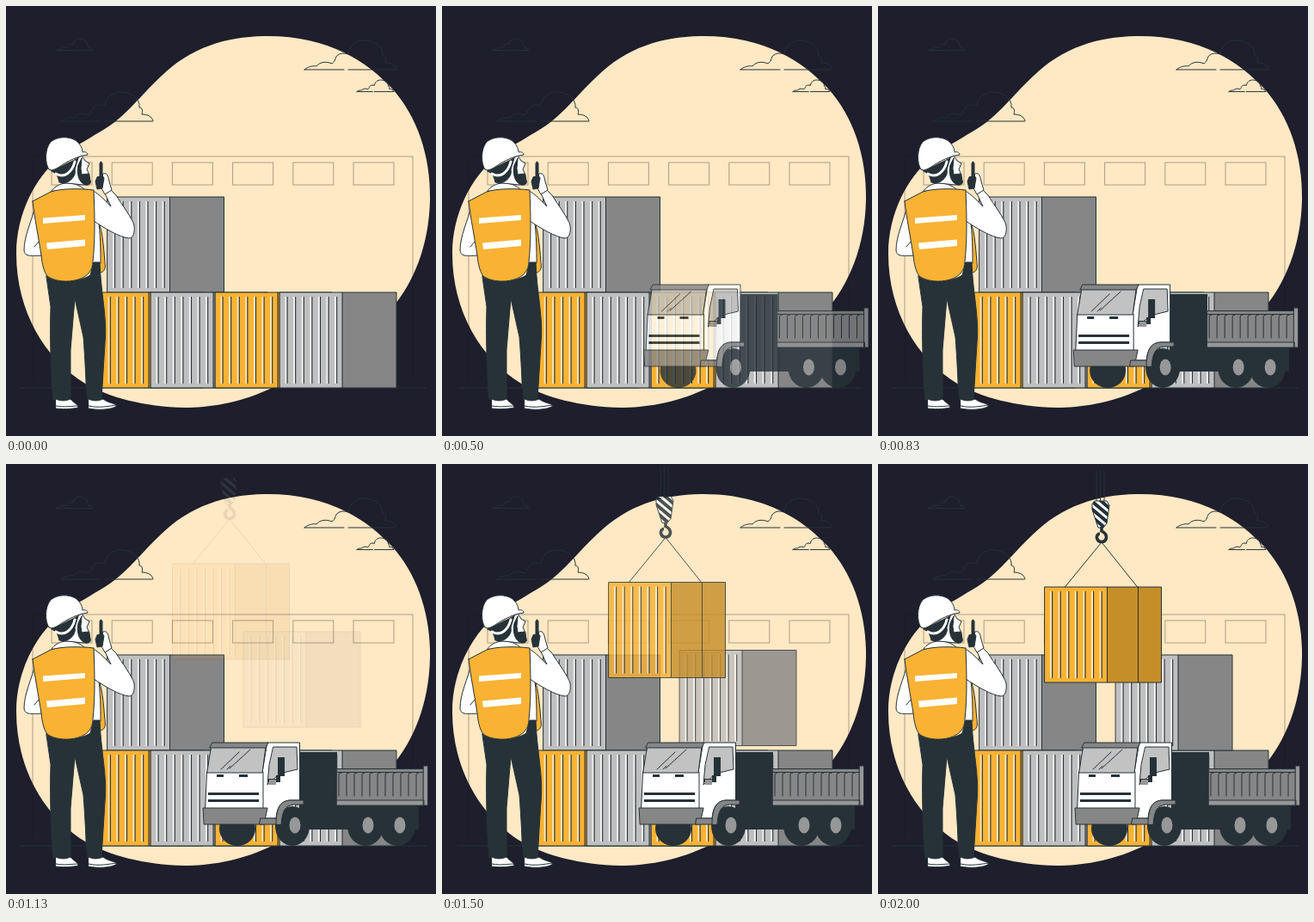
Animation of 500 by 500 pixels, one loop 2.04 s. Source, as an HTML page:

```html
<!DOCTYPE html>
<html lang="en">
<head>
<meta charset="utf-8">
<title>Loading yard</title>
<style>
html, body { margin: 0; width: 100%; height: 100%; overflow: hidden; background: #1e1e2c; }
svg { display: block; width: 100vw; height: 100vh; }
.ink { stroke: #263238; stroke-width: 1; stroke-linejoin: round; stroke-linecap: round; }
.dark { fill: #263238; }
.white { fill: #fff; }
.grey { fill: #868686; }
.pale { fill: #c2c2c2; }
.orange { fill: #f9b233; }
.line { fill: none; }
</style>
</head>
<body>
<svg viewBox="0 0 500 500">
  <defs>
    <g id="cloud" class="ink line">
      <path vector-effect="non-scaling-stroke" d="M0 34C3 31 10 29 14 30C18 25 25 24 32 27C37 24 35 19 39 17C43 14 47 15 51 16C52 6 60 0 69 0C82 0 92 8 91 18C95 18 95 23 94 26C100 26 106 28 107 34"/>
      <path vector-effect="non-scaling-stroke" d="M0 34H46M51 34H106"/>
    </g>
    <clipPath id="block"><path d="M252 43H266L269 48L266 69L262 74H256L249 53V47Z"/></clipPath>
  </defs>

  <path fill="#ffe8c4" d="M300 35C375 34 420 65 449 96C478 128 494 175 493 225C492 280 473 322 450 350C415 395 350 425 305 446C270 462 235 467 208 467C160 466 120 455 92 439C45 410 12 355 12 288C12 240 35 200 60 178C75 165 88 160 103 150C140 130 150 110 180 82C215 48 255 36 300 35Z"/>
  <g id="building" fill="none" stroke="#1c1a18" stroke-opacity=".36">
    <path d="M31 436V175H473V436"/>
  </g>
  <use href="#cloud" transform="translate(58 38) scale(.4)"/>
  <use href="#cloud" transform="translate(347 40)"/>
  <use href="#cloud" transform="translate(408 86) scale(.4)"/>
  <use href="#cloud" transform="translate(64 100)"/>
  <path class="ink" d="M18 444H489"/>

  <g id="stack"></g>
  <g id="load">
    <g id="greyLoad"></g>
    <g id="craneLoad">
      <path class="ink line" d="M254 8V44M258.500 8V44M263 8V44M217 143.500L260 91L302 143.500"/>
      <g clip-path="url(#block)">
        <rect class="white" x="246" y="40" width="26" height="36"/>
        <path stroke="#263238" stroke-width="4" d="M246 41L272 63M246 50L272 72M246 59L272 81M256 40L272 54"/>
      </g>
      <path class="ink line" d="M252 43H266L269 48L266 69L262 74H256L249 53V47Z"/>
      <path fill="none" stroke="#263238" stroke-width="3.600" d="M260 73V78C264 80 266 82 265.500 86C264 92 256 92 254.500 86C254 83 256 81 258 81"/>
    </g>
  </g>

  <g id="truck">
    <path class="dark" d="M341 335H385V397H480V425H341Z"/>
    <ellipse class="dark" cx="269" cy="424" rx="21" ry="20"/>
    <ellipse class="dark" cx="333" cy="421" rx="20" ry="23"/>
    <ellipse class="dark" cx="418" cy="421" rx="21" ry="23"/>
    <ellipse class="dark" cx="455" cy="421" rx="21" ry="23"/>
    <g fill="#979797">
      <ellipse cx="336" cy="420" rx="6.500" ry="9.500"/>
      <ellipse cx="421" cy="420" rx="6.500" ry="9.500"/>
      <ellipse cx="458" cy="420" rx="6.500" ry="9.500"/>
    </g>
    <g class="ink">
      <path class="white" d="M304 324H341.500V391H330C319 392 315 400 314 412H298V359Z"/>
      <path class="white" d="M234 358H299V401H232Z"/>
      <path class="pale" d="M239 329H302L298 359H234Z"/>
      <path class="grey" d="M240 324H305L302 330H237Z"/>
      <path class="pale" d="M311 329H338L339 355L318 360L304 373L306 350Z"/>
      <path class="line" d="M250 355L271 335M260 354L284 332M257 355L261 351"/>
      <path class="grey" d="M229.500 400H304L300 419H230.500Z"/>
      <path class="grey" d="M296 412H318L314 419H295Z"/>
      <path class="grey" d="M314 419C314 400 319 391 331 391H346V396H334C324 397 321 405 320 419Z"/>
    </g>
    <path class="dark" d="M245 361H253V364H245ZM271 361H281V364H271ZM235 382H294V385H235ZM235 390H294V393H235ZM316 341H324V363H319V370H305V366H314V362H316Z"/>
    <path fill="#979797" d="M306 367H314V373H306Z"/>
    <g id="bed" class="ink">
      <path class="grey" d="M384.500 354.500H486V397H384.500Z"/>
      <path fill="#979797" d="M384.500 391H486V397H384.500ZM485.500 351H490.500V397H485.500Z"/>
      <path class="line" d="M385 358.500H485"/>
    </g>
  </g>

  <g class="ink">
    <path class="orange" d="M107 250C113 260 114 290 115.500 303C115 308 111 311 108 310Z"/>
    <path class="white" d="M98 245H107C110 265 110 285 110 299H98Z"/>
    <path class="dark" d="M47 314C55 322 85 322 98 313L102 298H109C110 330 117 360 115.500 385L111 458H95C93 440 92 410 90 385L80 340L75 400V458H55C52 430 51 380 52 350Z"/>
    <path class="white" d="M58 457C64 460 70 459 75 457C79 462 84 463 84 467C75 469 64 469 58 468Z"/>
    <path class="white" d="M96 457C102 460 108 459 113 457C119 462 128 462 129 465C122 470 106 470 96 468Z"/>
    <path class="line" d="M58 465C68 467 77 465 84 465M96 465C108 468 120 465 129 464"/>
    <path class="white" d="M35 230C30 250 21 267 21 284C22 291 26 291 43 290L44 240Z"/>
    <path class="line" d="M33 280L38 274"/>
    <path class="white" d="M53 215C60 204 80 202 92 214Z"/>
    <path class="white" d="M101 215C108 218 117 228 122 233L115 218L122 214L128 220C134 230 147 247 149 255C150 263 148 270 143 270C132 269 114 258 102 250Z"/>
    <path class="white" d="M113 195C118 193 119 199 120 204L123 214L115 219L111 212Z"/>
    <path class="dark" d="M109 198V183Q110.500 179 112 183V197L114 200L112 212L106 213L104 204L106 199Z"/>
    <path class="orange" d="M31 227L52 216C65 212 85 212 102 214C103 240 104 270 101 297C101 308 94 315 84 318C72 322 55 320 48 314C44 309 42 300 41 290C38 270 33 245 31 227Z"/>
    <path class="white" d="M62 190L88 174L92 180L97 183L94 190L97 196L98 206L90 208L62 205Z"/>
    <path class="dark" d="M53 192L84 177L80 190C82 197 75 206 65 206C58 203 64 197 53 192Z"/>
    <path class="dark" d="M88 177L84 185C82 194 84 205 92 208C97 209 99 206 98 203L96 195L88 196L87 189Z"/>
    <path fill="none" stroke="#fff" stroke-width="3" d="M58 195C68 201 77 193 80 181"/>
    <path class="white" d="M50 190C45 183 45 166 52 158C62 150 78 152 84 159C88 163 89 168 89 170C93 169 95 171 95 173C85 174 72 180 62 187C57 190 53 192 50 190Z"/>
  </g>
  <path class="white" d="M43 246.500L92 243V249L43 253ZM47 275.500L92 271.500V279L48 283Z"/>
</svg>
<script>
const $ = id => document.getElementById(id);
const add = (id, markup) => $(id).insertAdjacentHTML("beforeend", markup);
const repeat = (n, make) => Array.from({ length: n }, (_, i) => make(i)).join("");

const palettes = {
  grey: { front: "#bfbfbf", side: "#868686", shine: "#f2f2f2" },
  orange: { front: "#f9b233", side: "#c68e28", shine: "#ffe8c4" }
};

function container(x, y, name) {
  const { front, side, shine } = palettes[name];
  const ribs = offset => repeat(7, i => `M${offset + 9.6 * i} 5V106`);
  return `<g transform="translate(${x} ${y})">
    <path class="ink" fill="${side}" d="M72.5 0H135.500V111H72.500Z"/>
    <path class="ink" fill="${front}" d="M0 0H72.500V111H0Z"/>
    <path stroke="${shine}" stroke-width="2" d="${ribs(7)}"/>
    <path stroke="#263238" stroke-width="1.1" d="${ribs(8.6)}"/>
  </g>`;
}

add("building", repeat(6, i => `<rect x="${53 + 70.2 * i}" y="182" width="47" height="26"/>`));
add("stack", container(118, 222, "grey") +
  repeat(4, i => container(93.5 + 75 * i, 333, i % 2 ? "grey" : "orange")));
add("greyLoad", container(276.5, 222, "grey"));
add("craneLoad", container(194, 143, "orange") + '<path class="ink" d="M302.500 143V254"/>');
add("bed", `<path class="line" d="${repeat(11, i => `M${387 + 9 * i} 386V361Q${387 + 9 * i} 359 ${390 + 9 * i} 359`)}"/>`);

const LOOP = 2040, FRAME = 1000 / 24, TRAVEL = 30;

const bezier = (a, b, s) => 3 * (1 - s) ** 2 * s * a + 3 * (1 - s) * s * s * b + s ** 3;

// cubic-bezier(.36, -.01, .5, 1.38), solved by bisection
function ease(t) {
  if (t <= 0) return 0;
  if (t >= 1) return 1;
  let low = 0, high = 1;
  for (let i = 0; i < 24; i++) {
    const mid = (low + high) / 2;
    if (bezier(.36, .5, mid) < t) low = mid; else high = mid;
  }
  return bezier(-.01, 1.38, low);
}

function place(id, progress, dx, dy) {
  const rest = TRAVEL * (1 - progress);
  $(id).setAttribute("transform", `translate(${dx * rest} ${dy * rest})`);
  $(id).setAttribute("opacity", Math.max(0, Math.min(1, progress)));
}

// The motion is stepped at 24 frames per second
function draw(ms) {
  const step = Math.floor((ms % LOOP + 5.1) / FRAME);
  const seconds = step < 2 ? 0 : step / 24 + .04;
  place("truck", ease(seconds), 1, 0);
  for (const id of ["greyLoad", "craneLoad"]) place(id, ease(seconds - 1), 0, -1);
}

const start = performance.now();
function tick() {
  draw(performance.now() - start);
  requestAnimationFrame(tick);
}
tick();
</script>
</body>
</html>
```
